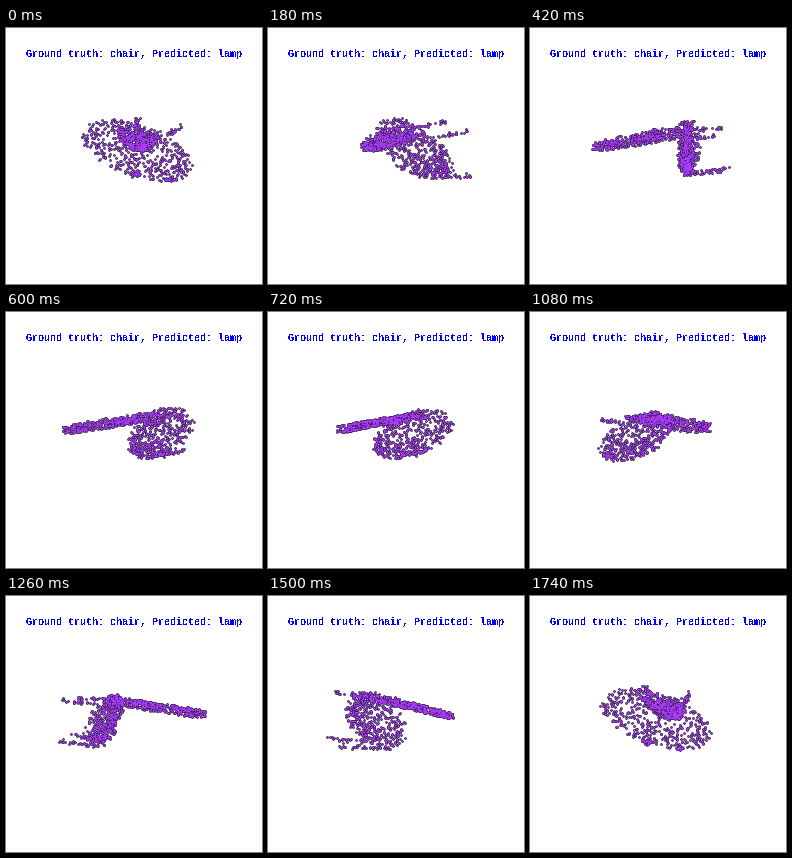
A matplotlib script that plays this animation: 256x256 px, repeating every 1800 ms.

```python
import numpy as np
import matplotlib.pyplot as plt
from matplotlib.animation import FuncAnimation

SIZE, DPI = 256, 64
FRAMES, STEP_MS = 30, 60
CENTER = np.array([128, 127])
CAMERA = 240        # distance from the turning axis
PHASE = 8           # degrees at the start of the loop
PT = 72 / DPI       # points per pixel

rng = np.random.default_rng(7)


def seat(n):
    """Upright elliptical slab, columns are (u, v, w) with v pointing down."""
    r = rng.random(n) ** 0.45
    a = rng.uniform(0, 2 * np.pi, n)
    w = 48.5 * r * np.cos(a)
    v = 24 * r * np.sin(a) + 0.26 * w
    u = 28.5 + 0.13 * v + rng.uniform(-5.5, 5.5, n)
    return np.column_stack([u, v - 4.5, w - 1])


def back(n):
    """Long rounded slab leaving the top of the seat, denser at its faces."""
    t = rng.random(n)
    u = 20 - 88 * t
    w = 4 - 0.12 * u + rng.uniform(-21, 21, n) * np.sqrt(1 - t ** 3.5)
    depth = 3 * np.sin(rng.uniform(0, 2 * np.pi, n))
    v = -19 - 0.16 * u + 0.14 * (w - 10) + depth
    return np.column_stack([u, v, w])


def leg(base, tip, n=22):
    t = rng.random((n, 1))
    base, tip = np.array(base), np.array(tip)
    return base + (tip - base) * t + rng.normal(0, 0.9, (n, 3))


points = np.vstack([
    seat(490),
    back(420),
    leg((32, -25, -3), (63, -27, -6)),
    leg((32, -17, 25), (64, -22, 27)),
    leg((34, 17, -4), (70, 12.5, -7)),
    leg((34, 21, 21), (71, 17.5, 20)),
])


def project(angle):
    u, v, w = points.T
    s, c = np.sin(angle), np.cos(angle)
    scale = CAMERA / (CAMERA - (u * c - w * s))
    return CENTER + np.column_stack([(u * s + w * c) * scale, v * scale])


fig = plt.figure(figsize=(SIZE / DPI, SIZE / DPI), dpi=DPI, facecolor="white")
ax = fig.add_axes([0, 0, 1, 1])
ax.set(xlim=(0, SIZE), ylim=(SIZE, 0))
ax.axis("off")
ax.text(20, 29, "Ground truth: chair, Predicted: lamp", color="#0000ff",
        family="Liberation Mono", weight="bold", size=10 * PT,
        antialiased=False)


def dots(diameter, color):
    return ax.plot([], [], "o", ms=diameter * PT, mew=0, color=color)[0]


layers = [dots(2.6, "#000000"), dots(1.7, "#a83cfa")]


def update(i):
    xy = project(np.radians(PHASE + 360 * i / FRAMES))
    for layer in layers:
        layer.set_data(*xy.T)
    return layers


anim = FuncAnimation(fig, update, frames=FRAMES, interval=STEP_MS,
                     repeat=True, repeat_delay=0)
plt.show()
```
